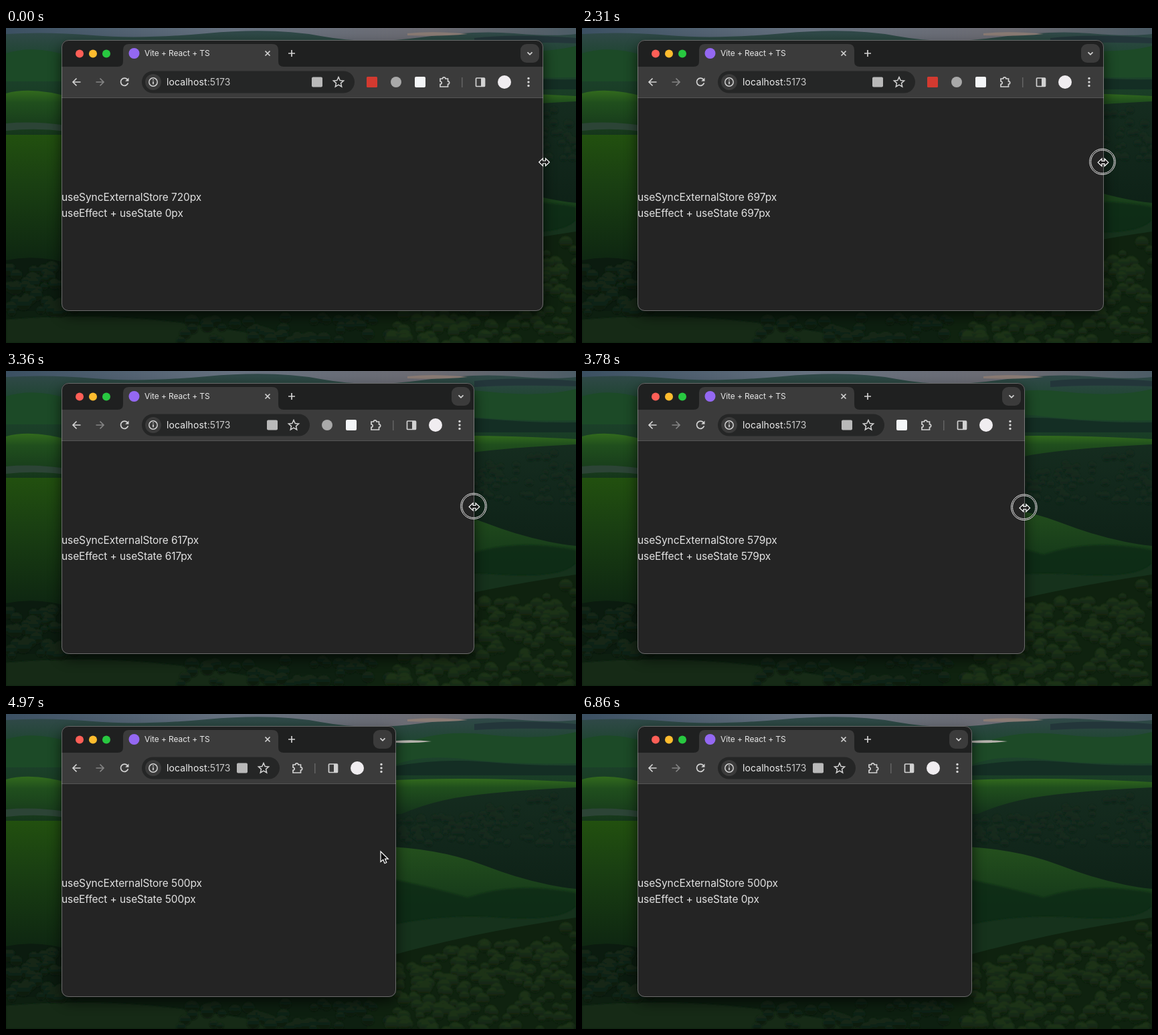
An HTML page for the animation above (8120 ms loop, 852 px wide and 472 px high).

```html
<!DOCTYPE html>
<html lang="en">
<head>
<meta charset="utf-8">
<title>Window resize</title>
<style>
  html, body { margin: 0; width: 100%; height: 100%; overflow: hidden; background: #10241a; }
  svg { display: block; width: 100vw; height: 100vh; }
  text { font-family: Inter, "Open Sans", sans-serif; white-space: pre; }
  .page { font-size: 15.5px; letter-spacing: -.09px; fill: #e2e2e2; }
  .line { fill: none; stroke: #d2d2d2; stroke-width: 1.7; }
</style>
</head>
<body>
<svg viewBox="0 0 852 472" preserveAspectRatio="none">
  <defs>
    <linearGradient id="sky"><stop offset="0" stop-color="#3b5062"/><stop offset=".4" stop-color="#66717f"/><stop offset=".75" stop-color="#6c6b72"/><stop offset="1" stop-color="#4c5c66"/></linearGradient>
    <linearGradient id="far" x2="0" y2="1"><stop offset="0" stop-color="#31494a"/><stop offset=".3" stop-color="#1f4531"/><stop offset="1" stop-color="#16391f"/></linearGradient>
    <linearGradient id="field" x2="0" y2="1"><stop offset="0" stop-color="#326a1d"/><stop offset=".25" stop-color="#204f1d"/><stop offset="1" stop-color="#14331b"/></linearGradient>
    <linearGradient id="slope" x2="0" y2="1"><stop offset="0" stop-color="#22500f"/><stop offset=".35" stop-color="#1a4012"/><stop offset="1" stop-color="#0d2411"/></linearGradient>
    <linearGradient id="wood" x2="0" y2="1"><stop offset="0" stop-color="#152c1f"/><stop offset="1" stop-color="#0d2016"/></linearGradient>
    <linearGradient id="hill" x2="0" y2="1"><stop offset="0" stop-color="#24501d"/><stop offset=".45" stop-color="#163a1a"/><stop offset="1" stop-color="#0e2715"/></linearGradient>
    <linearGradient id="darkTree" x2="0" y2="1"><stop offset="0" stop-color="#152a18"/><stop offset="1" stop-color="#0a180d"/></linearGradient>
    <linearGradient id="litTree" x2="0" y2="1"><stop offset="0" stop-color="#1f3617"/><stop offset="1" stop-color="#0d1d0f"/></linearGradient>
    <linearGradient id="dimTree" x2="0" y2="1"><stop offset="0" stop-color="#162d20"/><stop offset="1" stop-color="#0f2217"/></linearGradient>
    <filter id="soft" x="-5%" y="-5%" width="110%" height="110%"><feGaussianBlur stdDeviation="1"/></filter>
    <filter id="blur" x="-20%" y="-20%" width="140%" height="140%"><feGaussianBlur stdDeviation="10"/></filter>
    <clipPath id="frame"><rect class="sized" x="83" y="18" height="406" rx="10"/></clipPath>
  </defs>

  <g id="scenery">
    <rect width="852" height="472" fill="#10291a"/>
    <rect width="852" height="30" fill="url(#sky)"/>
    <path d="M0 9Q60 5 130 11T300 8T470 12T620 14T760 8T852 9V130H0z" fill="url(#far)"/>
    <path d="M600 8Q640 4 690 9Q650 13 600 11z" fill="#8a7b74"/>
    <path d="M583 50Q640 22 720 31T852 27V74Q760 76 690 68T583 76z" fill="#1d4a27"/>
    <path d="M0 38Q45 24 100 44V80H0z" fill="#1c4a27"/>
    <path d="M583 40Q610 38 636 41Q612 44 583 43z" fill="#b5b2ac"/>
    <path d="M700 15Q770 8 852 15V23Q770 20 700 24z" fill="#23363a"/>
    <path d="M583 78Q650 66 720 72T852 77V92H583z" fill="#142e24"/>
    <path d="M560 100Q690 93 852 102V150H560z" fill="url(#field)"/>
    <path d="M0 98Q40 87 100 105V165H0z" fill="url(#field)"/>
    <path d="M0 143Q40 139 90 146V155Q45 149 0 154z" fill="#2c4436"/>
    <path d="M0 160H100V360H0z" fill="url(#slope)"/>
    <path d="M560 165Q620 132 690 123T852 110V290H560z" fill="url(#wood)"/>
    <path d="M540 198Q640 198 715 227T852 262V380H540z" fill="url(#hill)"/>
    <path d="M540 240Q620 255 690 275Q760 250 852 268V345Q700 305 540 332z" fill="#102c17" opacity=".8" filter="url(#soft)"/>
    <path d="M540 325Q640 298 735 305T852 288V390H540z" fill="#12301a" filter="url(#soft)"/>
    <path d="M0 348Q50 338 100 355V472H0z" fill="#0b1b0f"/>
    <path d="M0 424H852V472H0z" fill="#0d1f10"/>
    <path d="M0 437Q160 423 320 450T560 472H0z" fill="#132c17" filter="url(#soft)"/>
    <path d="M540 372Q680 330 852 305V472H540z" fill="#0f220f"/>
  </g>

  <rect class="sized" x="83" y="27" height="404" rx="12" fill="#000" opacity=".65" filter="url(#blur)"/>

  <g clip-path="url(#frame)">
    <rect x="83" y="18" width="740" height="406" fill="#242424"/>
    <rect x="83" y="18" width="740" height="40" fill="#1f2020"/>
    <rect x="83" y="58" width="740" height="46" fill="#3b3b3b"/>
    <rect x="83" y="104" width="740" height="1" fill="#565656"/>
    <path d="M167 58q8 0 8-8V33q0-9 9-9H398q9 0 9 9V50q0 8 8 8z" fill="#3b3b3b"/>
    <circle cx="110" cy="38.500" r="6" fill="#fe5f57"/>
    <circle cx="130" cy="38.500" r="6" fill="#febc2e"/>
    <circle cx="150" cy="38.500" r="6" fill="#28c840"/>
    <circle id="favicon" cx="191.500" cy="38" r="8" fill="#9468f2"/>
    <text x="207" y="42.300" font-size="12" letter-spacing="-.08" fill="#e8e8e8">Vite + React + TS</text>
    <path class="line" d="M387.500 34.500l7 7m0-7l-7 7M422 38h10m-5-5v10"/>

    <path class="line" d="M111.500 81H100m5.500-5.500L100 81l5.500 5.500"/>
    <path class="line" d="M134.500 81H146m-5.500-5.500L146 81l-5.500 5.500" style="stroke:#848484"/>
    <g id="reload">
      <path class="line" d="M181.500 77.200A5.600 5.600 0 1 0 182.500 82.300"/>
      <path d="M183.500 74.500v5.300h-5.300z" fill="#d2d2d2"/>
    </g>
    <path id="stop" class="line" d="M172 76l10 10m0-10l-10 10"/>

    <rect id="pill" x="203" y="64.500" height="33" rx="16.500" fill="#252626"/>
    <circle cx="220" cy="81" r="12" fill="#3b3b3b"/>
    <circle class="line" cx="220" cy="81" r="6.200" style="stroke-width:1.500"/>
    <path class="line" d="M220 80v4.300m0-7.300v1.600"/>
    <text x="240" y="86" font-size="14" letter-spacing=".09" fill="#ececec">localhost<tspan fill="#c9c9c9">:5173</tspan></text>
    <g id="pillEnd">
      <rect x="-64" y="73.500" width="16" height="15" rx="2" fill="#b9b9b9"/>
      <path class="line" d="M-24 73.500l2.200 5 5.400.5-4.100 3.600 1.200 5.300-4.700-2.800-4.700 2.800 1.200-5.300-4.100-3.600 5.400-.5z" style="stroke-width:1.500"/>
    </g>

    <g id="rightEnd">
      <rect x="-34" y="24" width="28" height="28" rx="9" fill="#3b3b3b"/>
      <path class="line" d="M-23.500 36.300l3.500 3.500 3.500-3.500"/>
      <rect class="pin" x="-264" y="73" width="16" height="16" rx="1.500" fill="#d33a30"/>
      <circle class="pin" cx="-220" cy="81" r="8" fill="#a9a9a9"/>
      <rect class="pin" x="-192" y="73" width="16" height="16" rx="2" fill="#f4f6f8"/>
      <path class="line" transform="translate(-147 80)" d="M-7-4h3.500a2.200 2.200 0 0 1 4.400 0h3.600v3.900a2.200 2.200 0 0 1 0 4.400v3.700h-11.500v-3.700a2.200 2.200 0 0 0 0-4.400z"/>
      <rect x="-122" y="74" width="1.500" height="15" fill="#646464"/>
      <rect class="line" x="-100.500" y="75" width="13" height="12.500" rx="1"/>
      <rect x="-93" y="75" width="6" height="12.500" fill="#d2d2d2"/>
      <circle cx="-58" cy="81" r="10" fill="#f0edf0"/>
      <g fill="#d2d2d2"><circle cx="-22" cy="75.500" r="1.700"/><circle cx="-22" cy="81" r="1.700"/><circle cx="-22" cy="86.500" r="1.700"/></g>
    </g>

    <text id="storeText" class="page" x="83" y="258.800"></text>
    <text id="effectText" class="page" x="83" y="282.800"></text>
  </g>
  <rect id="border" x="83.500" y="18.500" height="405" rx="10" fill="none" stroke="#fff" stroke-opacity=".33"/>

  <g id="ring" fill="none" stroke="#e6e6e6">
    <circle r="18.400" stroke="#222" stroke-opacity=".6" stroke-width="2"/>
    <circle r="19.300"/><circle r="17.300"/>
  </g>
  <path id="resizer" d="M-7.800 0L-2-5.600V-2H2V-5.600L7.800 0 2 5.600V2H-2V5.600z" fill="#181818" stroke="#fff" stroke-width="1.200"/>
  <path id="arrow" d="M0 0V15.500L3.700 12.200 6 17.700 8.800 16.500 6.500 11.200H11.300z" fill="#0c0c0c" stroke="#fff" stroke-width="1.200"/>
</svg>

<script>
const LOOP = 8120, STEP = 70, LEFT = 83;
const $ = id => document.getElementById(id);
const all = selector => [...document.querySelectorAll(selector)];
const sized = all('.sized'), pins = all('.pin');

// Rows are [time, value, value, ...], joined by straight segments.
const widthTrack = [[1890, 720], [2100, 711], [2660, 673], [2800, 661], [3360, 617], [3500, 615], [4200, 526], [4340, 516], [4550, 500]];
const dragTrack = [[1820, 804.5, 201], [1890, 804, 201], [2100, 794, 201], [2660, 754, 202], [2800, 742.5, 202.3], [3360, 700, 203.5], [3500, 698, 204], [4200, 607.5, 207], [4340, 597, 207], [4760, 562.5, 207.5]];
const arrowTrack = [[6090, 560, 206], [6370, 126, 44], [6510, 126, 44], [6790, 560, 336]];

function track(rows, t) {
  if (t <= rows[0][0]) return rows[0].slice(1);
  for (let i = 1; i < rows.length; i++) {
    const a = rows[i - 1], b = rows[i];
    if (t <= b[0]) {
      const k = (t - a[0]) / (b[0] - a[0]);
      return a.slice(1).map((v, j) => v + (b[j + 1] - v) * k);
    }
  }
  return rows[rows.length - 1].slice(1);
}

const within = (t, from, to) => t >= from && t < to;
const show = (el, on) => el.setAttribute('visibility', on ? 'visible' : 'hidden');
const move = (el, x, y = 0) => el.setAttribute('transform', `translate(${x} ${y})`);

function plantTrees() {
  let seed = 11;
  const rand = () => (seed = (seed * 16807) % 2147483647) / 2147483647;
  const grove = (count, x0, x1, top, bottom, size, fill) => {
    const trees = Array.from({ length: count }, () => {
      const x = x0 + rand() * (x1 - x0), y0 = top(x);
      return { x, y: y0 + rand() * (bottom - y0), r: size * (.6 + rand() * .6) };
    });
    trees.sort((a, b) => a.y - b.y);
    return trees.map(({ x, y, r }) =>
      `<ellipse cx="${x.toFixed(1)}" cy="${y.toFixed(1)}" rx="${r.toFixed(1)}" ry="${(r * .9).toFixed(1)}" fill="url(#${fill})"/>`).join('');
  };
  $('scenery').insertAdjacentHTML('beforeend', '<g filter="url(#soft)">' +
    grove(110, 590, 852, x => 160 - (x - 590) * .16, 195, 6, 'dimTree') +
    grove(55, 0, 105, () => 358, 428, 9, 'darkTree') +
    grove(50, 250, 580, () => 432, 472, 9, 'darkTree') +
    grove(220, 575, 852, x => 375 - (x - 575) * .22, 475, 9, 'litTree') + '</g>');
}

function draw(time) {
  const t = Math.floor((time % LOOP) / STEP) * STEP;
  const width = Math.round(track(widthTrack, t)[0]);
  const right = LEFT + width;

  sized.forEach(el => el.setAttribute('width', width));
  $('border').setAttribute('width', width - 1);
  move($('rightEnd'), right);

  // Pinned icons drop out from the left when the address bar gets too short.
  let pinned = 3;
  const pillRight = () => right - 174 - 36 * pinned;
  while (pinned && pillRight() < 440) pinned--;
  pins.forEach((el, i) => show(el, i >= 3 - pinned));
  $('pill').setAttribute('width', pillRight() - 203);
  move($('pillEnd'), pillRight());

  const loading = within(t, 560, 630) || within(t, 6230, 6370);
  show($('reload'), !loading);
  show($('stop'), loading);
  pins[0].setAttribute('opacity', loading ? .5 : 1);

  const measured = within(t, 1960, 6300) ? width : 0;
  $('storeText').textContent = `useSyncExternalStore ${width}px`;
  $('effectText').textContent = `useEffect + useState ${measured}px`;

  const [x, y] = track(dragTrack, t);
  move($('resizer'), x, y);
  move($('ring'), x - 1, y - 1);
  show($('resizer'), t < 4970);
  show($('ring'), within(t, 1400, 4970));
  move($('arrow'), ...track(arrowTrack, t));
  show($('arrow'), within(t, 4970, 6860));
}

plantTrees();
const start = performance.now();
function tick() {
  draw(performance.now() - start);
  requestAnimationFrame(tick);
}
tick();
</script>
</body>
</html>
```
